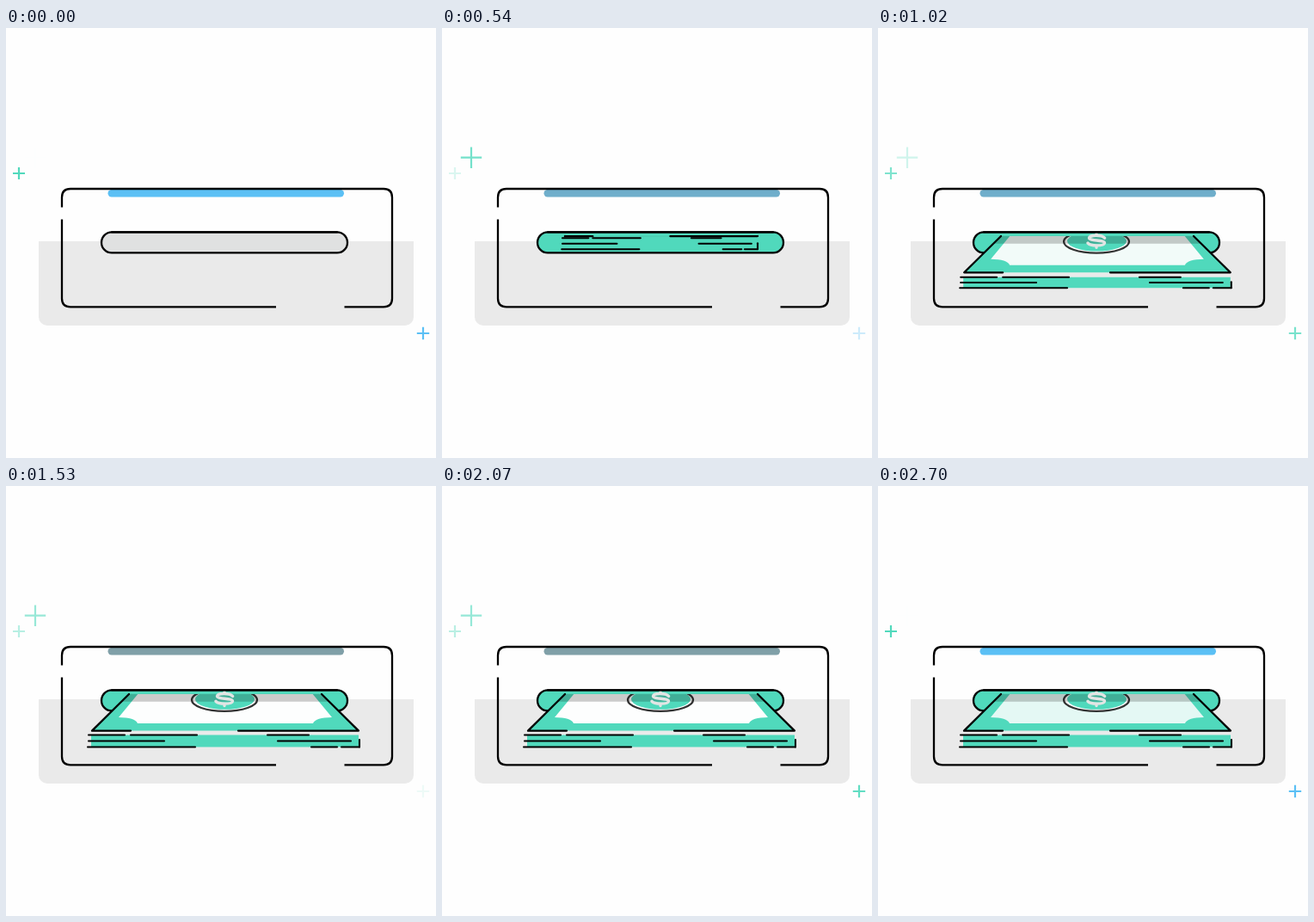
An HTML page with a canvas for the animation above (2.73 s loop, 500 by 500 pixels).

```html
<!DOCTYPE html>
<html>
<head>
<meta charset="utf-8">
<style>
  html, body { margin: 0; width: 100%; height: 100%; overflow: hidden; background: #fefefe; }
  canvas { display: block; width: 500px; height: 500px; }
</style>
</head>
<body>
<canvas id="stage" width="500" height="500"></canvas>
<script>
const ctx = document.getElementById('stage').getContext('2d');
const LOOP = 2730, TEAL = '#50d9bc', BLUE = '#5bc0f5';
const MID = 253.5, HORIZON = 133, SLOT_TOP = 242;

// Keyframe tracks: [time, value], linear in between
const FLASH = [[0, 1], [540, .45], [810, 0], [1020, .45], [1200, .85], [1500, 0], [2200, 0], [2700, 1]];
const EDGE = [[360, 215], [540, 242], [690, 272], [810, 288.5], [900, 286.5], [1020, 284.3], [1200, 284.6]];
const DROP = [[540, 2], [690, 5], [810, 8], [900, 6.5], [1020, 5.4], [1200, 4.9]];
const SPACING = [[540, 6.5], [690, 9], [810, 10.75], [900, 8], [1020, 6.3], [1200, 7]];
const SIDE_LINES = [
  [[96, 138], [145, 222], [304, 352]],
  [[96, 184], [316, 401]],
  [[95, 220], [355, 385], [390, 411]]
];

const lerp = (a, b, k) => a + (b - a) * k;

function track(keys, t) {
  if (t <= keys[0][0]) return keys[0][1];
  for (let i = 1; i < keys.length; i++) {
    const [t0, a] = keys[i - 1], [t1, b] = keys[i];
    if (t < t1) return lerp(a, b, (t - t0) / (t1 - t0));
  }
  return keys[keys.length - 1][1];
}

const pulse = t => Math.abs(1 - 2 * (((t / 900) % 1 + 1) % 1));

function mix(a, b, k) {
  return `rgb(${a.map((v, i) => Math.round(lerp(v, b[i], k))).join()})`;
}

function fill(path, color) {
  ctx.fillStyle = color;
  ctx.fill(new Path2D(path));
}

function stroke(path, color = '#000', width = 2.3) {
  ctx.strokeStyle = color;
  ctx.lineWidth = width;
  ctx.stroke(new Path2D(path));
}

function roundRect(x, y, w, h, r, color) {
  ctx.beginPath();
  ctx.roundRect(x, y, w, h, r);
  ctx.fillStyle = color;
  ctx.fill();
}

function ellipse(x, y, rx, ry) {
  ctx.beginPath();
  ctx.ellipse(x, y, rx, ry, 0, 0, 7);
}

function clipBelow(y) {
  ctx.beginPath();
  ctx.rect(0, y, 500, 500);
  ctx.clip();
}

function plus(x, y, r, color, alpha) {
  ctx.globalAlpha = alpha;
  ctx.lineCap = 'butt';
  stroke(`M${x - r} ${y}h${2 * r}M${x} ${y - r}v${2 * r}`, color, 2.2);
  ctx.lineCap = 'round';
  ctx.globalAlpha = 1;
}

function drawFace(edge, scaleX, scaleY, flash) {
  const left = MID - 153.5 * scaleX, right = MID + 156.5 * scaleX;
  if (edge > SLOT_TOP) fill(`M143 ${SLOT_TOP}H367L${right} ${edge}H${left}Z`, TEAL);

  const perspective = () => {
    ctx.translate(MID, HORIZON);
    ctx.scale(scaleX, scaleY);
    ctx.translate(-MID, -HORIZON);
  };
  ctx.save();
  clipBelow(SLOT_TOP);
  ctx.save();
  perspective();
  fill('M159 235H351L379 269Q360 269 357 276H153Q150 269 131 269Z',
    mix([253, 254, 254], [228, 248, 244], flash));
  ellipse(254, 248.7, 38, 13);
  ctx.fillStyle = '#fff';
  ctx.fill();
  ctx.strokeStyle = '#333';
  ctx.lineWidth = 2.3;
  ctx.stroke();
  ellipse(254.5, 248, 34.5, 11.7);
  ctx.fillStyle = TEAL;
  ctx.fill();
  ctx.restore();
  if (edge > SLOT_TOP) {
    const depth = Math.min(8.7, edge - SLOT_TOP);
    fill(`M143 ${SLOT_TOP}H367l${depth} ${depth}H${143 - depth}Z`, 'rgba(0,0,0,.2)');
  }
  ctx.restore();

  ctx.save();
  perspective();
  stroke('M263.5 244.3C260 240.3 246 240.7 245.5 244.2C245.5 248.3 263.5 246 263.5 250.3' +
    'C262.5 254 247 254 244 250.3M254 239.5v1.5M254 253.5v2', '#e2e5e4', 3.4);
  ctx.restore();

  if (edge > SLOT_TOP) {
    const gap = x => MID + (x - MID) * scaleX;
    stroke(`M143 ${SLOT_TOP}L${left} ${edge}H${gap(145)}M${gap(270)} ${edge}H${right}L367 ${SLOT_TOP}`);
  }
}

function drawSide(top, spacing, scaleX) {
  const px = x => MID + (x - MID) * scaleX;
  const bottom = top + 2 * spacing;
  fill(`M${px(99)} ${top}H${px(410)}V${bottom}H${px(99)}Z`, TEAL);
  SIDE_LINES.forEach((row, i) => row.forEach(([a, b]) =>
    stroke(`M${px(a)} ${top + i * spacing}H${px(b)}`, '#000', 2.1)));
  const rise = 7 + 3.9 * Math.max(0, spacing - 6.6);
  stroke(`M${px(411)} ${bottom}v${-rise}`, '#000', 2.1);
}

function drawCash(t, flash) {
  if (t < 360) return;
  const edge = track(EDGE, t);
  const scaleY = (edge - HORIZON) / (284.5 - HORIZON);
  const scaleX = Math.min(1, scaleY);
  ctx.save();
  clipBelow(238.5);
  drawSide(edge + track(DROP, t), track(SPACING, t), scaleX);
  drawFace(edge, scaleX, scaleY, flash);
  ctx.restore();
}

function draw(t) {
  const flash = track(FLASH, t);
  ctx.fillStyle = '#fefefe';
  ctx.fillRect(0, 0, 500, 500);
  ctx.lineCap = 'round';
  ctx.lineJoin = 'round';

  // Machine
  roundRect(38, 248, 436, 98, [0, 0, 10, 10], '#eaeaea');
  roundRect(118.5, 188, 274.5, 8.5, 4.2, mix([128, 160, 168], [91, 192, 245], flash));
  ctx.lineCap = 'butt';
  stroke('M65 208.5V197Q65 187 75 187H439Q449 187 449 197V314.5Q449 324.3 439 324.3H393.5' +
    'M314 324.3H75Q65 324.3 65 314.5V222.5');
  ctx.lineCap = 'round';

  // Slot with its shutter
  roundRect(111, 237.4, 286, 24, 12, TEAL);
  ctx.globalAlpha = Math.max(0, 1 - t / 400);
  roundRect(111, 237.4, 286, 24, 12, '#e1e1e1');
  ctx.globalAlpha = 1;
  ctx.beginPath();
  ctx.roundRect(111, 237.4, 286, 24, 12);
  ctx.strokeStyle = '#000';
  ctx.lineWidth = 2.3;
  ctx.stroke();

  drawCash(t, flash);
  stroke('M123 237.4H385');

  // Sparkles
  const glow = pulse(t);
  plus(15, 169, 7, TEAL, glow);
  plus(34, 150.7, 12.2, TEAL, 1 - glow);
  const late = t < 225 ? 1 : t < 2475 ? pulse(t - 225) : Math.min(1, (t - 2475) / 225);
  plus(485, 355, 7.2, t < 675 || t >= 2475 ? BLUE : TEAL, late);
}

const start = performance.now();
function tick() {
  draw((performance.now() - start) % LOOP);
  requestAnimationFrame(tick);
}
tick();
</script>
</body>
</html>
```
